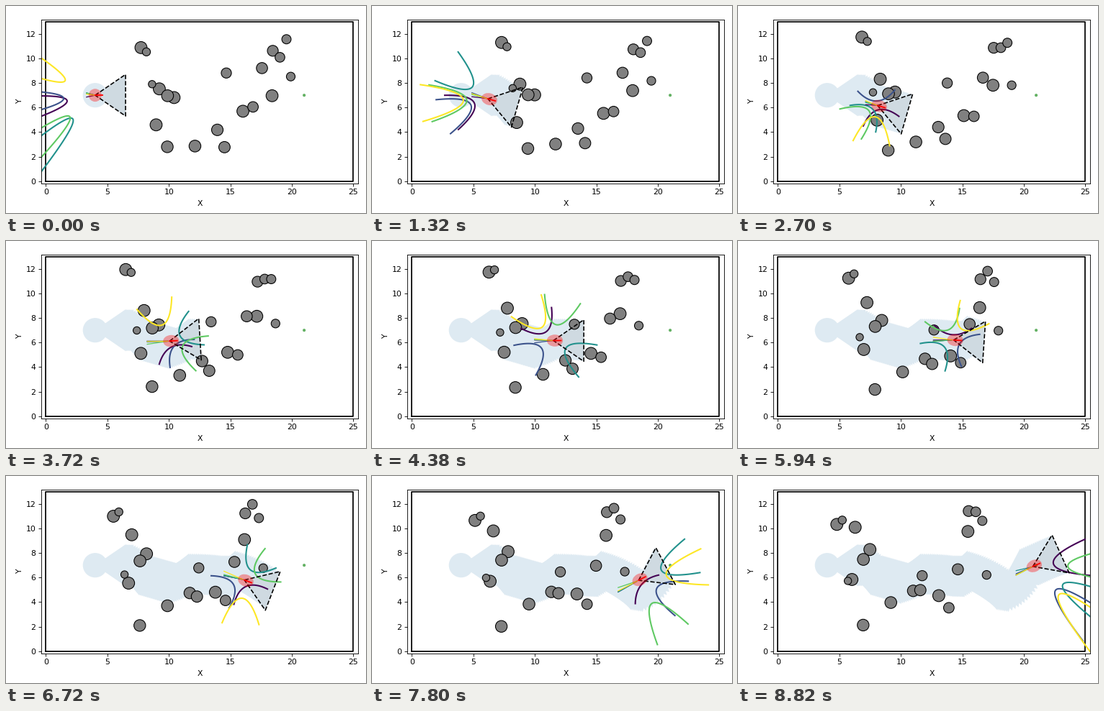
These frames come from a looping animation (500x288 px, 8.88 s). A matplotlib script:

```python
import numpy as np
import matplotlib.pyplot as plt
from matplotlib.animation import FuncAnimation
from matplotlib.collections import PolyCollection
from matplotlib.patches import Circle, Ellipse, Polygon

FRAMES, INTERVAL, DT = 148, 60, 0.1
FOV, REACH, ROBOT_R = 0.6, 3.0, 0.5
DRIFT = -0.2
Y_LOW, Y_SPAN = 2.0, 10.0
SEEN = "#deeaf2"

# Obstacles from largest to smallest: x, y, vertical speed
STARTS = np.array([
    (7.73, 10.88, .19), (9.22, 7.52, .175), (10.42, 6.81, .1),
    (8.96, 4.59, .085), (16.02, 5.7, -.08), (18.39, 6.96, .19),
    (9.89, 6.96, .035), (12.12, 2.86, .075), (9.87, 2.8, -.063),
    (13.94, 4.18, .05), (14.52, 2.77, .15), (17.57, 9.21, -.173),
    (18.45, 10.62, .054), (16.84, 6.05, -.171), (14.67, 8.81, -.181),
    (19.03, 10.09, .174), (19.56, 11.56, -.064), (19.91, 8.52, -.157),
    (8.17, 10.53, .19), (8.63, 7.9, -.148),
])
RADII = 0.49 - 0.19 * np.linspace(0, 1, len(STARTS)) ** 3

# Key steps of the drive: step -> speed, step -> heading in degrees
SPEED = {0: .5, 9: 1.2, 45: .72, 60: 1.5, 85: .88,
         105: 1.55, 120: 1.2, 136: 1.75, 147: 1.1}
HEADING = {8: 0, 17: -16, 45: -16, 57: 5, 76: -1, 85: -1,
           90: 8, 112: -21, 118: -17, 129: 28, 147: 24.3}


def ramp(keys):
    return np.interp(np.arange(FRAMES), list(keys), list(keys.values()))


def unit(angle):
    return np.stack([np.cos(angle), np.sin(angle)], axis=-1)


def drive():
    """Integrate speed and heading into positions."""
    heading = np.radians(ramp(HEADING))
    vel = ramp(SPEED)[:, None] * unit(heading)
    steps = (vel[:-1] + vel[1:]) / 2 * DT
    pos = np.array([4.0, 7.0]) + np.vstack([[0, 0], np.cumsum(steps, axis=0)])
    return pos, heading, vel


def obstacles_at(k):
    """Positions and velocities, bouncing between the y limits."""
    x, y, vy = STARTS.T
    u = (y + vy * k * DT - Y_LOW) % (2 * Y_SPAN)
    height = Y_LOW + Y_SPAN - np.abs(u - Y_SPAN)
    vy = np.where(u < Y_SPAN, vy, -vy)
    return (np.column_stack([x + DRIFT * k * DT, height]),
            np.column_stack([np.full_like(vy, DRIFT), vy]))


def parabola(pos, gap, radius, v_rel):
    """Barrier boundary in the line-of-sight frame."""
    dist = np.hypot(*gap)
    clear = np.sqrt(max(dist ** 2 - (radius + ROBOT_R) ** 2, 0.01))
    across = np.linspace(-1.5, 1.5, 80)
    along = -0.5 * clear * (1 + across ** 2 / np.hypot(*v_rel))
    ex, ey = gap / dist
    return (pos[0] + along * ex - across * ey,
            pos[1] + along * ey + across * ex)


path, headings, velocity = drive()
cones = [np.array([p, p + REACH * unit(h + FOV), p + REACH * unit(h - FOV)])
         for p, h in zip(path, headings)]

fig = plt.figure(figsize=(6.4, 3.6864), dpi=78.125)
ax = fig.add_axes([48.9 / 500, 41.1 / 288, 440.1 / 500, 228.4 / 288])
ax.set_xlim(-0.385, 25.385)
ax.set_ylim(-0.185, 13.185)
ax.set_xticks(range(0, 26, 5))
ax.set_yticks(range(0, 13, 2))
ax.set_xlabel("X", labelpad=5.5)
ax.set_ylabel("Y", labelpad=2.7)

ax.plot([0, 25, 25, 0, 0], [0, 0, 13, 13, 0], "k", lw=1.6)
ax.add_patch(Circle((4, 7), 1, fc=SEEN, ec="none", zorder=0.5))
seen = PolyCollection([cones[0]], facecolors=SEEN, edgecolors="none", zorder=0.5)
ax.add_collection(seen, autolim=False)
ax.add_patch(Circle((21, 7), 0.11, color="green", alpha=0.6, lw=0.3))

cone_fill = ax.add_patch(Polygon(cones[0], fc="black", ec="none",
                                 alpha=0.065, zorder=0.8))
balls = [ax.add_patch(Circle((0, 0), r, fc="gray", ec="black", lw=1))
         for r in RADII]
body = ax.add_patch(Ellipse((4, 7), 1, 1, fc="red", ec="none",
                            alpha=0.35, zorder=2.4))
colors = plt.cm.viridis(np.linspace(0, 1, 5))
curves = [ax.plot([], [], color=c, lw=1.9)[0] for c in colors]
rel_lines = [ax.plot([], [], color=c, lw=1.2)[0] for c in colors]
cone_edge, = ax.plot([], [], "k--", lw=1.5, zorder=2.2)
arrow, = ax.plot([], [], color="red", lw=1.7, zorder=2.5)


def draw_barriers(k):
    pos = path[k]
    centers, vels = obstacles_at(k)
    gaps = centers - pos
    nearest = np.argsort(np.hypot(*gaps.T))[:5]
    for curve, line, j in zip(curves, rel_lines, nearest):
        v_rel = vels[j] - velocity[k]
        curve.set_data(*parabola(pos, gaps[j], RADII[j], v_rel))
        line.set_data(*np.array([pos, pos + v_rel]).T)


def draw(k):
    pos, heading = path[k], headings[k]
    ahead = unit(heading)
    for ball, center in zip(balls, obstacles_at(k)[0]):
        ball.center = center

    seen.set_verts(cones[:k + 1])
    cone_fill.set_xy(cones[k])
    cone_edge.set_data(*cones[k][[0, 1, 2, 0]].T)

    stretch = min(k / 10, 1)
    body.set_center(pos + 0.12 * stretch * ahead)
    body.width = 1.05 + 0.25 * stretch
    body.height = 1.05 - 0.08 * stretch
    body.angle = np.degrees(heading)
    arrow.set_data(*np.array([pos, pos + 0.62 * ahead]).T)

    # Barriers belong to the state before the latest control step
    draw_barriers(max(k - 1, 0))
    return [seen, cone_fill, cone_edge, body, arrow, *balls, *curves, *rel_lines]


anim = FuncAnimation(fig, draw, frames=FRAMES, interval=INTERVAL,
                     repeat=True, repeat_delay=0, blit=False)
plt.show()
```
